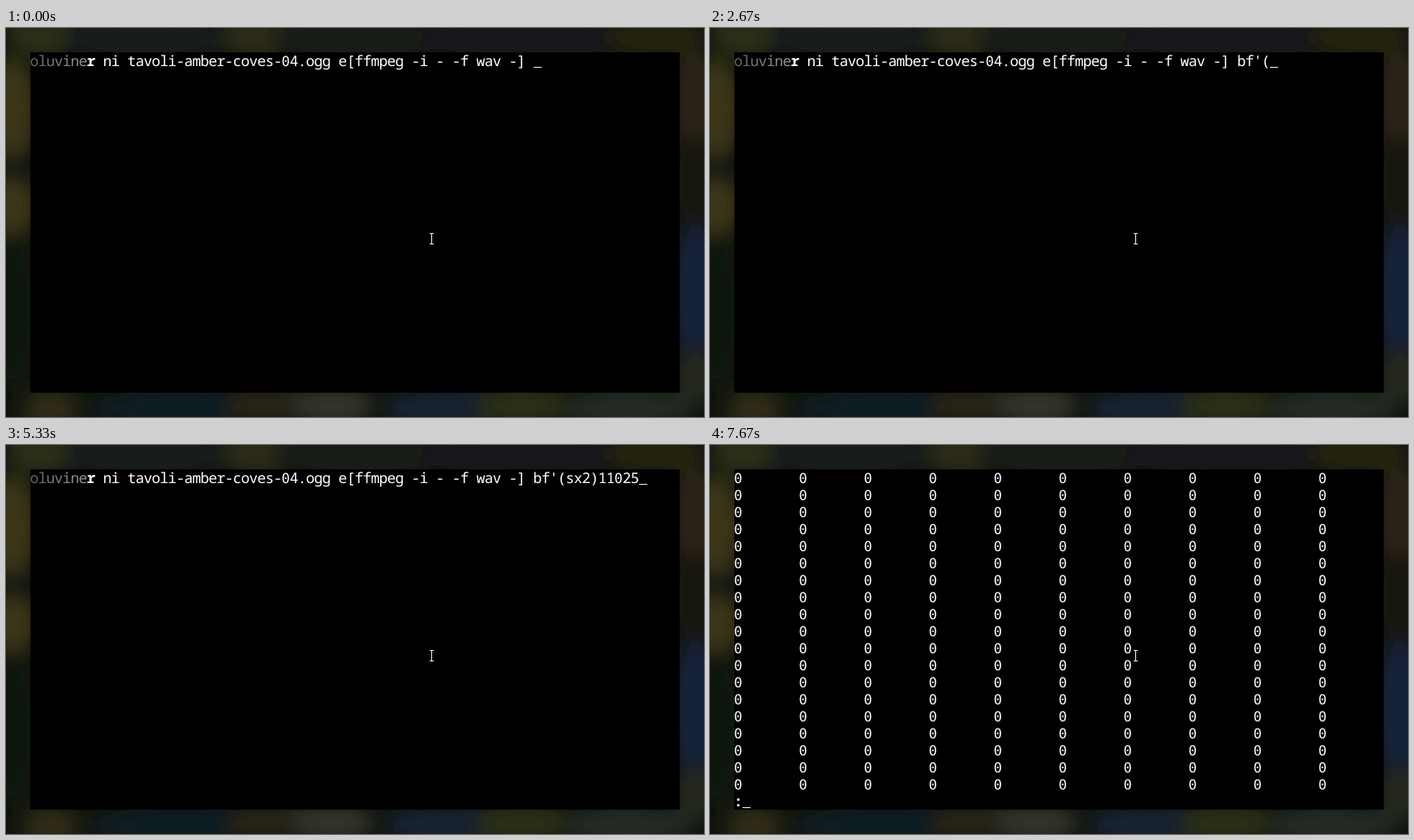
An HTML page for the animation above (8 s loop, 860 by 480 pixels).

```html
<!DOCTYPE html>
<html lang="en">
<head>
<meta charset="utf-8">
<title>Terminal session</title>
<style>
  html, body { margin: 0; width: 100%; height: 100%; overflow: hidden; background: #10140e; }
  svg { display: block; width: 860px; height: 480px; }
  text {
    font: 500 18px "Noto Sans Mono", "DejaVu Sans Mono", monospace;
    letter-spacing: -0.8px;
    fill: #fff;
    white-space: pre;
    text-rendering: geometricPrecision;
  }
  .zero { font: 17px "DejaVu Sans Mono", monospace; letter-spacing: -0.235px; }
  .bold { font-weight: 700; }
</style>
</head>
<body>
<svg viewBox="0 0 860 480">
  <defs>
    <filter id="soft" filterUnits="userSpaceOnUse" x="-40" y="-40" width="940" height="560">
      <feGaussianBlur stdDeviation="11"/>
    </filter>
  </defs>
  <rect width="860" height="480" fill="#10140e"/>
  <g id="scenery" filter="url(#soft)"></g>
  <rect x="30" y="30" width="800" height="420"/>
  <g id="command"></g>
  <g id="firstPage"></g>
  <g id="zeroPage"></g>
  <rect id="cursor" width="10" height="1" fill="#fff"/>
  <path d="M522 253.5h5M524.5 254v12M522 266.5h5" fill="none" stroke="#fff"/>
</svg>
<script>
const NS = "http://www.w3.org/2000/svg";
const LOOP = 8000, LEFT = 30, BASE = 47, CELL = 10, LINE = 21;
const $ = id => document.getElementById(id);

function add(parent, tag, attrs = {}, content = "") {
  const el = document.createElementNS(NS, tag);
  for (const k in attrs) el.setAttribute(k, attrs[k]);
  el.textContent = content;
  return parent.appendChild(el);
}

// Dotted zeros come from a second face.
function write(el, str) {
  el.textContent = "";
  for (const part of str.split(/(0)/)) {
    if (part) add(el, "tspan", part === "0" ? { class: "zero" } : {}, part);
  }
}

// The small shift centres each glyph in its cell.
function put(parent, col, row, str, attrs = {}) {
  const el = add(parent, "text", { x: LEFT + col * CELL - 0.4, y: BASE + row * LINE, ...attrs });
  write(el, str);
  return el;
}

// Dim landscape: colour, centre x, centre y, radius x, radius y
[
  ["#2b2e18", 45, 6, 45, 30], ["#161e1a", 170, 12, 100, 30],
  ["#292b16", 310, 8, 45, 30], ["#171b12", 440, 12, 110, 30],
  ["#14181a", 640, 14, 130, 30], ["#24210f", 800, 10, 60, 30],
  ["#3a3418", 8, 100, 30, 65], ["#3a3418", 8, 220, 30, 38],
  ["#0b140c", 8, 350, 32, 95], ["#2a2416", 850, 90, 30, 65],
  ["#15150f", 850, 190, 30, 55], ["#16233a", 850, 325, 30, 85],
  ["#22281c", 850, 430, 30, 35], ["#2e2c18", 55, 470, 35, 25],
  ["#111c24", 215, 470, 110, 25], ["#282412", 325, 464, 55, 22],
  ["#31362c", 402, 466, 50, 22], ["#122030", 545, 470, 80, 25],
  ["#2b2f18", 635, 466, 58, 24], ["#222a22", 765, 470, 80, 25]
].forEach(([fill, cx, cy, rx, ry]) => add($("scenery"), "ellipse", { fill, cx, cy, rx, ry }));

[..."oluvine"].forEach((c, i) => {
  const v = 100 + i * 8;
  put($("command"), i, 0, c, { style: `fill:rgb(${v},${v},${v})` });
});
put($("command"), 7, 0, "r", { class: "bold" });
const head = "ni tavoli-amber-coves-04.ogg e[ffmpeg -i - -f wav -] ";
const line = put($("command"), 9, 0, head);

const samples = [
  [18770, -1, 16727, 28006, 16, 1, -21436, -20208, 4, 18764],
  [26, 20041, 21321, 14, 24908, 13877, 11824, 49, 24948, -1]
];
function page(group, rows) {
  for (let r = 0; r < 19; r++)
    for (let c = 0; c < 10; c++)
      put(group, c * 8, r, String(rows[r] ? rows[r][c] : 0));
  put(group, 0, 19, ":", { class: "bold" });
}
page($("firstPage"), samples);
page($("zeroPage"), []);

const TYPED = "bf'(sx2)11025";
// time, number of typed characters
const keys = [
  [0, 0], [2000, 1], [2330, 3], [2670, 4], [3330, 5], [3670, 6],
  [4000, 7], [4330, 8], [4670, 9], [5000, 11], [5330, 13]
];
const PAGER = 6330, SCROLL = 7000;
let shown = -1;

function show(id, on) { $(id).style.display = on ? "" : "none"; }

function draw(t) {
  const paging = t >= PAGER;
  const count = keys.filter(k => k[0] <= t).pop()[1];
  if (count !== shown) {
    write(line, head + TYPED.slice(0, count));
    shown = count;
  }
  show("command", !paging);
  show("firstPage", paging && t < SCROLL);
  show("zeroPage", t >= SCROLL);
  show("cursor", t >= 2000 || t % 1000 < 500);
  const col = paging ? 1 : 62 + count;
  $("cursor").setAttribute("x", LEFT + col * CELL);
  $("cursor").setAttribute("y", BASE + 1 + (paging ? 19 * LINE : 0));
}

const start = performance.now();
function tick() {
  draw((performance.now() - start) % LOOP);
  requestAnimationFrame(tick);
}
tick();
</script>
</body>
</html>
```
